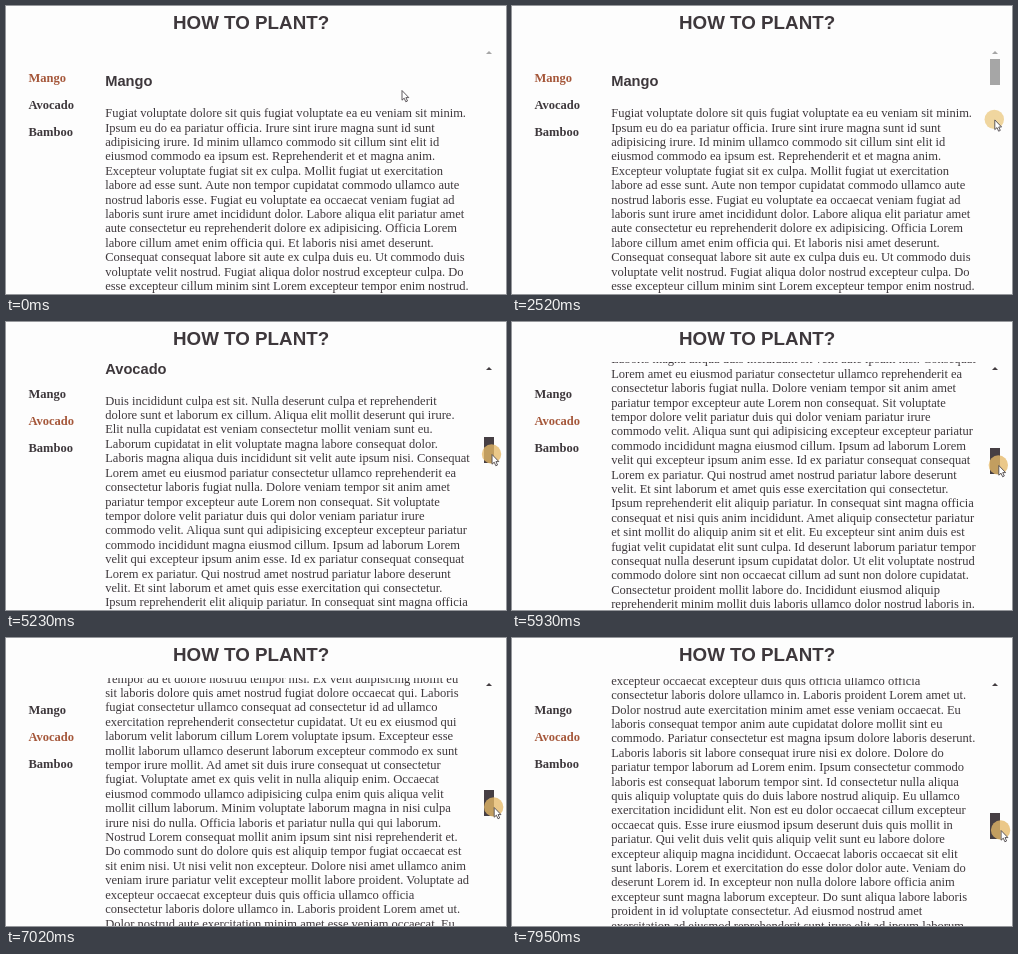
Recreate the animation shown at these times as an HTML page. Size 500 px wide and 288 px high, loop 8000 ms.

```html
<!DOCTYPE html>
<html lang="en">
<head>
<meta charset="utf-8">
<title>How to plant?</title>
<style>
  html, body { margin: 0; width: 100%; height: 100%; overflow: hidden; background: #fdfdfd; }
  #stage { position: relative; width: 500px; height: 288px; overflow: hidden; color: #3e383c;
    font: 12.53px/14.4px "Liberation Serif", "Times New Roman", serif; }
  #stage > * { position: absolute; margin: 0; white-space: nowrap; }
  h1, h3 { font-family: "Liberation Sans", Arial, sans-serif; font-weight: bold; }
  h1 { left: 167px; top: 4.5px; font-size: 18.8px; line-height: 24px; }
  nav { left: 22.4px; top: 65px; font-weight: bold; }
  nav div { height: 27px; }
  nav .on { color: #a5573a; }
  #view { left: 99.2px; top: 40px; width: 375px; height: 248px; overflow: hidden; }
  #text { padding-top: 13.3px; }
  h3 { margin: 14.2px 0 15.7px; font-size: 14.66px; line-height: 17px; }
  p { margin: 0; white-space: pre; }
  #up { left: 480px; top: 45px; border: solid transparent; border-width: 0 3px 3px; border-bottom-color: #433d41; }
  #up.off { border-bottom-color: #a6a6a6; }
  #thumb { left: 478px; top: 0; width: 10px; height: 26px; background: #a6a6a6; }
  #thumb.held { background: #463f44; }
  #mouse { left: 0; top: 0; overflow: visible; }
  #mouse circle { fill: rgba(234, 198, 122, .72); }
  #mouse.held circle { fill: rgba(230, 184, 104, .78); }
</style>
</head>
<body>
<div id="stage">
  <h1>HOW TO PLANT?</h1>
  <nav><div>Mango</div><div>Avocado</div><div>Bamboo</div></nav>
  <div id="view"><div id="text">
    <h3>Mango</h3>
    <p>Fugiat voluptate dolore sit quis fugiat voluptate ea eu veniam sit minim.
Ipsum eu do ea pariatur officia. Irure sint irure magna sunt id sunt
adipisicing irure. Id minim ullamco commodo sit cillum sint elit id
eiusmod commodo ea ipsum est. Reprehenderit et et magna anim.
Excepteur voluptate fugiat sit ex culpa. Mollit fugiat ut exercitation
labore ad esse sunt. Aute non tempor cupidatat commodo ullamco aute
nostrud laboris esse. Fugiat eu voluptate ea occaecat veniam fugiat ad
laboris sunt irure amet incididunt dolor. Labore aliqua elit pariatur amet
aute consectetur eu reprehenderit dolore ex adipisicing. Officia Lorem
labore cillum amet enim officia qui. Et laboris nisi amet deserunt.
Consequat consequat labore sit aute ex culpa duis eu. Ut commodo duis
voluptate velit nostrud. Fugiat aliqua dolor nostrud excepteur culpa. Do
esse excepteur cillum minim sint Lorem excepteur tempor enim nostrud.</p>
    <p id="middle"></p>
    <p>proident. Consectetur voluptate proident id ad aute id aliqua. Aliquip
laboris nostrud eu exercitation ea amet dolor ipsum id dolore. Ut dolore
labore tempor ad elit dolore Lorem exercitation voluptate do. Culpa
pariatur in voluptate non excepteur voluptate quis elit enim minim amet
consequat exercitation do. Et cillum et est reprehenderit. Reprehenderit
ea velit enim aliquip deserunt fugiat ut nisi. Aliquip id non laborum qui
minim reprehenderit officia proident nulla eu anim ut incididunt et.
Eiusmod quis esse magna fugiat sit sint adipisicing magna aute. Nulla
voluptate elit nisi nisi nulla. Nulla ullamco elit duis id tempor non
aliqua.</p>
    <h3>Avocado</h3>
    <p>Duis incididunt culpa est sit. Nulla deserunt culpa et reprehenderit
dolore sunt et laborum ex cillum. Aliqua elit mollit deserunt qui irure.
Elit nulla cupidatat est veniam consectetur mollit veniam sunt eu.
Laborum cupidatat in elit voluptate magna labore consequat dolor.
Laboris magna aliqua duis incididunt sit velit aute ipsum nisi. Consequat
Lorem amet eu eiusmod pariatur consectetur ullamco reprehenderit ea
consectetur laboris fugiat nulla. Dolore veniam tempor sit anim amet
pariatur tempor excepteur aute Lorem non consequat. Sit voluptate
tempor dolore velit pariatur duis qui dolor veniam pariatur irure
commodo velit. Aliqua sunt qui adipisicing excepteur excepteur pariatur
commodo incididunt magna eiusmod cillum. Ipsum ad laborum Lorem
velit qui excepteur ipsum anim esse. Id ex pariatur consequat consequat
Lorem ex pariatur. Qui nostrud amet nostrud pariatur labore deserunt
velit. Et sint laborum et amet quis esse exercitation qui consectetur.
Ipsum reprehenderit elit aliquip pariatur. In consequat sint magna officia
consequat et nisi quis anim incididunt. Amet aliquip consectetur pariatur
et sint mollit do aliquip anim sit et elit. Eu excepteur sint anim duis est
fugiat velit cupidatat elit sunt culpa. Id deserunt laborum pariatur tempor
consequat nulla deserunt ipsum cupidatat dolor. Ut elit voluptate nostrud
commodo dolore sint non occaecat cillum ad sunt non dolore cupidatat.
Consectetur proident mollit labore do. Incididunt eiusmod aliquip
reprehenderit minim mollit duis laboris ullamco dolor nostrud laboris in.
Tempor ad et dolore nostrud tempor nisi. Ex velit adipisicing mollit eu
sit laboris dolore quis amet nostrud fugiat dolore occaecat qui. Laboris
fugiat consectetur ullamco consequat ad consectetur id ad ullamco
exercitation reprehenderit consectetur cupidatat. Ut eu ex eiusmod qui
laborum velit laborum cillum Lorem voluptate ipsum. Excepteur esse
mollit laborum ullamco deserunt laborum excepteur commodo ex sunt
tempor irure mollit. Ad amet sit duis irure consequat ut consectetur
fugiat. Voluptate amet ex quis velit in nulla aliquip enim. Occaecat
eiusmod commodo ullamco adipisicing culpa enim quis aliqua velit
mollit cillum laborum. Minim voluptate laborum magna in nisi culpa
irure nisi do nulla. Officia laboris et pariatur nulla qui qui laborum.
Nostrud Lorem consequat mollit anim ipsum sint nisi reprehenderit et.
Do commodo sunt do dolore quis est aliquip tempor fugiat occaecat est
sit enim nisi. Ut nisi velit non excepteur. Dolore nisi amet ullamco anim
veniam irure pariatur velit excepteur mollit labore proident. Voluptate ad
excepteur occaecat excepteur duis quis officia ullamco officia
consectetur laboris dolore ullamco in. Laboris proident Lorem amet ut.
Dolor nostrud aute exercitation minim amet esse veniam occaecat. Eu
laboris consequat tempor anim aute cupidatat dolore mollit sint eu
commodo. Pariatur consectetur est magna ipsum dolore laboris deserunt.
Laboris laboris sit labore consequat irure nisi ex dolore. Dolore do
pariatur tempor laborum ad Lorem enim. Ipsum consectetur commodo
laboris est consequat laborum tempor sint. Id consectetur nulla aliqua
quis aliquip voluptate quis do duis labore nostrud aliquip. Eu ullamco
exercitation incididunt elit. Non est eu dolor occaecat cillum excepteur
occaecat quis. Esse irure eiusmod ipsum deserunt duis quis mollit in
pariatur. Qui velit duis velit quis aliquip velit sunt eu labore dolore
excepteur aliquip magna incididunt. Occaecat laboris occaecat sit elit
sunt laboris. Lorem et exercitation do esse dolor dolor aute. Veniam do
deserunt Lorem id. In excepteur non nulla dolore labore officia anim
excepteur sunt magna laborum excepteur. Do sunt aliqua labore laboris
proident in id voluptate consectetur. Ad eiusmod nostrud amet
exercitation ad eiusmod reprehenderit sunt irure elit ad ipsum laborum</p>
  </div></div>
  <div id="up"></div>
  <div id="thumb"></div>
  <svg id="mouse" width="20" height="20">
    <circle r="9.7"/>
    <path d="M.5 .5V10.2L2.7 8.2L4.3 11.8L6 11L4.4 7.6H7.3Z" fill="#fff" stroke="#4d484c" stroke-width=".9"/>
  </svg>
</div>
<script>
  const $ = s => document.querySelector(s);
  const LOOP = 8000, STEP = 78, RATIO = 9.55, TOP = 53;

  // [time, scroll offset]
  const scrollKeys = [[2830, 0], [3310, 429], [4010, 429], [4720, 585], [5190, 585], [5230, 594],
    [5300, 594], [5320, 603], [5600, 603], [5650, 613], [5740, 613], [6340, 831], [6510, 831],
    [6560, 841], [6680, 841], [7270, 1013], [7380, 1013], [7410, 1032], [7470, 1032],
    [7490, 1042], [7620, 1042], [7960, 1163]];
  // [time, x, y]; while dragging, y follows the thumb
  const mouseKeys = [[60, 395.5, 84], [810, 473.5, 60], [1080, 483, 66], [1500, 483.5, 66],
    [2060, 482.3, 106.5], [2160, 482.3, 106.5], [2230, 482.3, 111], [2480, 482.3, 111],
    [2530, 482.3, 113.5], [2640, 482.3, 113.5], [2690, 482.3, 114], [3140, 482.3, 114],
    [3310, 482.3, 98], [3470, 484, 84], [3780, 485.5, 113], [5230, 485.5, 0], [6560, 487, 0],
    [7490, 488.3, 0], [7960, 488.6, 0]];

  function at(keys, t, i = 1) {
    const n = keys.findIndex(k => k[0] > t);
    if (n < 0) return keys[keys.length - 1][i];
    if (!n) return keys[0][i];
    const a = keys[n - 1], b = keys[n];
    return a[i] + (b[i] - a[i]) * (t - a[0]) / (b[0] - a[0]);
  }

  function filler(count) {
    const words = ("minim velit ea aliquip laborum nostrud officia sunt dolore amet elit magna commodo " +
      "fugiat excepteur irure tempor consequat id est ullamco voluptate qui labore").split(" ");
    let seed = 7, line = "", cap = true;
    const rand = n => (seed = (seed * 16807) % 2147483647) % n;
    const lines = [];
    while (lines.length < count) {
      let w = words[rand(words.length)];
      if (cap) w = w[0].toUpperCase() + w.slice(1);
      cap = rand(9) === 0;
      if (cap) w += ".";
      if ((line + w).length > 68) { lines.push(line.trim()); line = ""; }
      line += w + " ";
    }
    return lines.join("\n");
  }
  $("#middle").textContent = filler(13);

  const tabs = document.querySelectorAll("nav div");
  const text = $("#text"), up = $("#up"), thumb = $("#thumb"), mouse = $("#mouse"), halo = $("#mouse circle");
  const move = (el, x, y) => el.style.transform = `translate(${x}px, ${y}px)`;

  function draw(now) {
    const t = Math.floor((now % LOOP - 70) / STEP) * STEP + 110;
    const scroll = Math.round(at(scrollKeys, t));
    const thumbY = Math.round(TOP + scroll / RATIO);
    const held = t > 3760;
    const pressed = held || (t > 1190 && t < 3290);
    move(text, 0, -scroll);
    move(thumb, 0, thumbY);
    move(mouse, at(mouseKeys, t), held ? thumbY + 17 : at(mouseKeys, t, 2));
    thumb.style.visibility = t > 880 ? "visible" : "hidden";
    thumb.classList.toggle("held", held);
    mouse.classList.toggle("held", held);
    up.classList.toggle("off", scroll === 0);
    halo.style.visibility = pressed ? "visible" : "hidden";
    const active = scroll > 560 ? 1 : 0;
    tabs.forEach((tab, i) => tab.classList.toggle("on", i === active));
  }

  const start = performance.now();
  function tick() {
    draw(performance.now() - start);
    requestAnimationFrame(tick);
  }
  tick();
</script>
</body>
</html>
```
